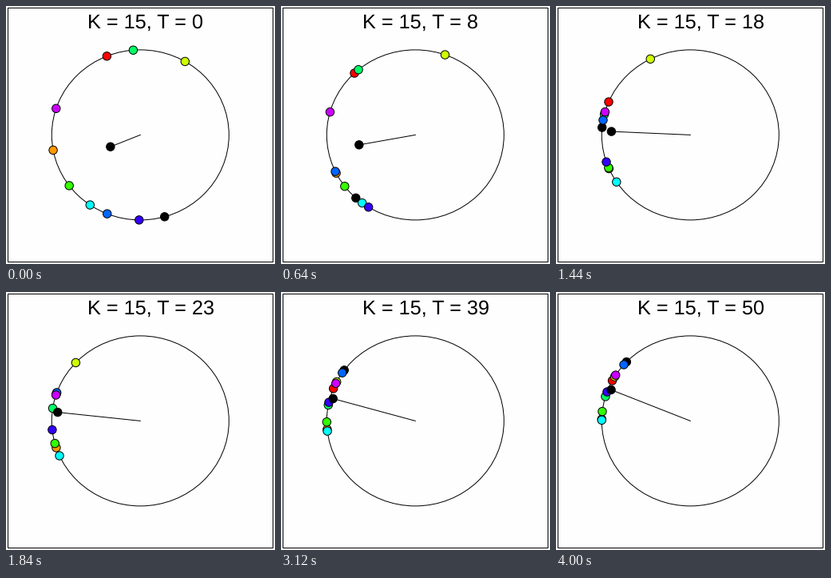
Animation, 337 px wide and 323 px high, one loop 4080 ms. Source, as a matplotlib script:

```python
import colorsys

import matplotlib.pyplot as plt
import numpy as np
from matplotlib.animation import FuncAnimation
from matplotlib.patches import Ellipse, Rectangle

W, H, DPI = 337, 323, 64
PX = 72 / DPI                      # points per pixel
FRAMES, INTERVAL = 51, 80
CX, CY, RX, RY = 168.3, 161.4, 111, 106.5
COUPLING = 0.15                    # radians per step

# Oscillators: black, then nine hues from red to purple
START = np.radians([285.9, 112.2, 190.3, 59.7, 216.6,
                    94.6, 235.4, 248.0, 269.2, 161.9])
OMEGA = np.radians([-3.69, -1.44, 2.37, -1.81, 1.66,
                    0.24, 2.44, -3.33, -0.29, -2.07])
COLORS = ["black"] + [colorsys.hsv_to_rgb(i / 10, 1, 1) for i in range(9)]


def velocity(phase):
    """Kuramoto model: every phase is pulled towards the mean field."""
    field = np.exp(1j * phase).mean()
    return OMEGA + COUPLING * (field * np.exp(-1j * phase)).imag


def step(phase):
    a = velocity(phase)
    b = velocity(phase + a / 2)
    c = velocity(phase + b / 2)
    d = velocity(phase + c)
    return phase + (a + 2 * b + 2 * c + d) / 6


def simulate():
    phases = [START]
    for _ in range(FRAMES - 1):
        phases.append(step(phases[-1]))
    return phases


def to_stage(z):
    return np.column_stack([CX + RX * z.real, CY - RY * z.imag])


plt.rcParams["font.family"] = "Liberation Sans"
plt.rcParams["text.hinting"] = "none"

fig = plt.figure(figsize=(W / DPI, H / DPI), dpi=DPI, facecolor="white")
ax = fig.add_axes([0, 0, 1, 1])
ax.set_xlim(0, W)
ax.set_ylim(H, 0)
ax.axis("off")

# Whole coordinates snap to the middle of the pixel
ax.add_patch(Rectangle((2, 2), 332, 318, fc="#fefefe", ec="black", lw=PX))
ax.add_patch(Ellipse((CX, CY), 2 * RX, 2 * RY, fill=False, ec="black", lw=PX))
title = ax.text(102, 27.3, "", size=25.2 * PX, va="baseline", ha="left")
arm, = ax.plot([], [], color="black", lw=PX, zorder=3)

PHASES = simulate()

# The last dot marks the mean field
dots = ax.scatter(np.zeros(len(COLORS) + 1), np.zeros(len(COLORS) + 1),
                  s=(10.4 * PX) ** 2, c=COLORS + ["black"],
                  edgecolors="black", linewidths=PX, zorder=4)


def draw(t):
    points = np.exp(1j * PHASES[t])
    places = to_stage(np.append(points, points.mean()))
    dots.set_offsets(places)
    mx, my = places[-1]
    arm.set_data([CX, mx], [CY, my])
    title.set_text(f"K = 15, T = {t}")
    return dots, arm, title


anim = FuncAnimation(fig, draw, frames=FRAMES, init_func=lambda: draw(0),
                     interval=INTERVAL, repeat=True, repeat_delay=0)
plt.show()
```
